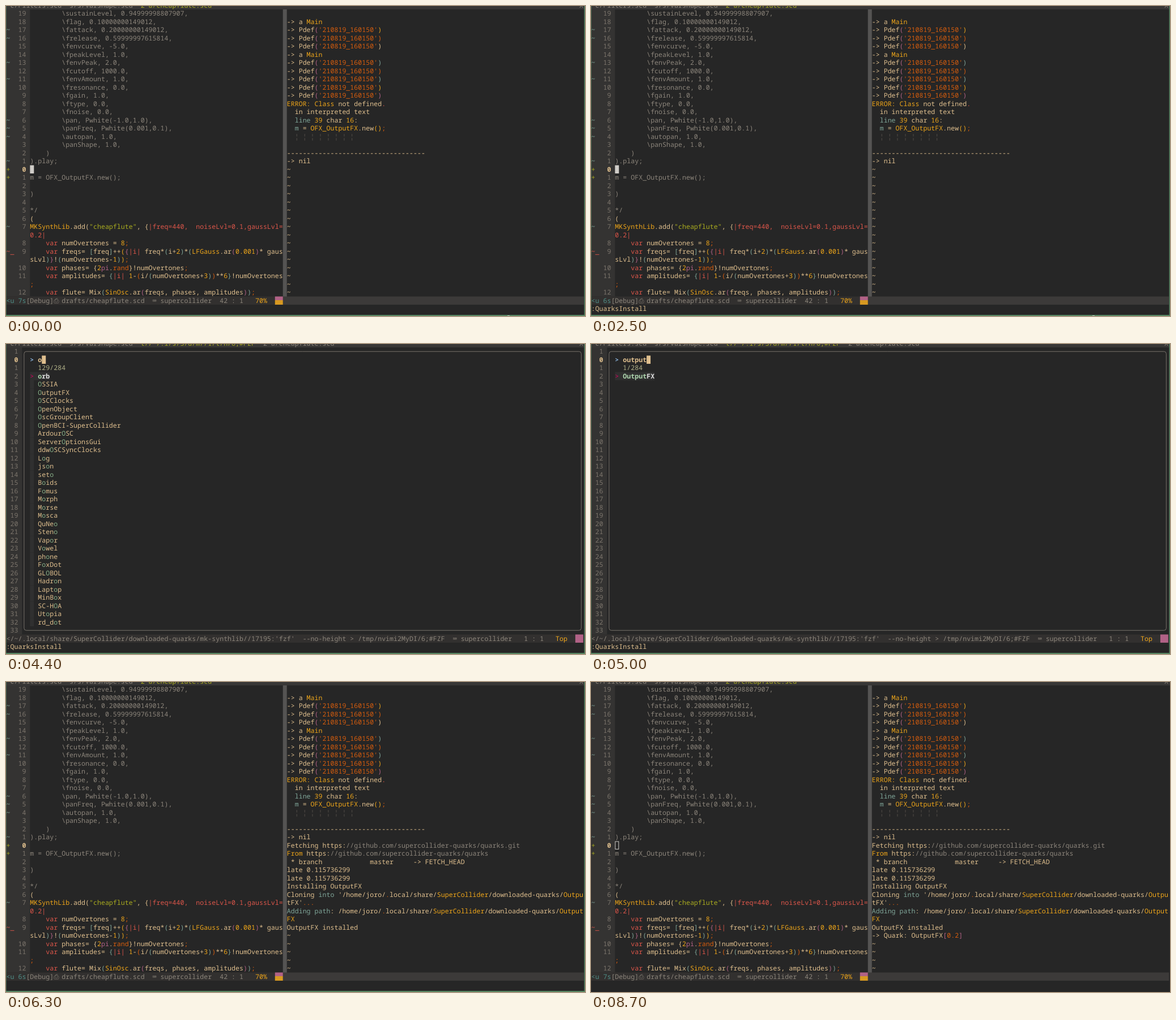
Animation of 1022 by 548 pixels, one loop 8.8 s. Source, as an HTML page with a canvas:

```html
<!DOCTYPE html>
<html lang="en">
<head>
<meta charset="utf-8">
<title>Installing a quark</title>
<style>
  html, body { margin: 0; width: 100%; height: 100%; overflow: hidden; background: #262626; }
  canvas { display: block; }
</style>
</head>
<body>
<canvas id="stage" width="1022" height="548"></canvas>
<script>
const ctx = document.getElementById('stage').getContext('2d');
const LOOP = 8800, W = 6.975, H = 14.5, X0 = 0.5, Y0 = 6, RIGHT = 71;
const FONT = '11.625px "Noto Sans Mono", "DejaVu Sans Mono", "DejaVu Sans", monospace';
const BG = '#262626', GUTTER = '#343332', BAR = '#32302f';

// Text may hold ^ plus one of these letters to switch colour.
const INK = {
  f: '#dfbf8e', g: '#8c857b', n: '#7c756c', y: '#eda51a', s: '#d65d0e', r: '#dc564a',
  G: '#a9ab1f', a: '#7fa598', p: '#b16286', d: '#5a544e', t: '#4f8f88',
  h: '#87af87', H: '#afd7af', w: '#e4e4e4', b: '#87afd7', m: '#d7005f', i: '#afaf87'
};

const x = col => X0 + col * W;
const y = row => Y0 + row * H;

function box(col, row, cols, color, rows = 1) {
  ctx.fillStyle = color;
  ctx.fillRect(x(col), y(row), cols * W, rows * H);
}

function put(col, row, text, ink = 'f', bold = false) {
  ctx.font = (bold ? 'bold ' : '') + FONT;
  ctx.fillStyle = INK[ink];
  for (let i = 0; i < text.length; i++) {
    if (text[i] === '^') ctx.fillStyle = INK[text[++i]];
    else {
      if (text[i] !== ' ') ctx.fillText(text[i], x(col), y(row) + 11);
      col++;
    }
  }
}

// Last value whose start time has passed.
const at = (steps, t) => steps.reduce((v, [start, next]) => t >= start ? next : v, 0);

const code = String.raw`
        \sustainLevel, 0.94999998807907,
        \flag, 0.10000000149012,
        \fattack, 0.20000000149012,
        \frelease, 0.59999997615814,
        \fenvcurve, -5.0,
        \fpeakLevel, 1.0,
        \fenvPeak, 2.0,
        \fcutoff, 1000.0,
        \fenvAmount, 1.0,
        \fresonance, 0.0,
        \fgain, 1.0,
        \ftype, 0.0,
        \fnoise, 0.0,
        \pan, Pwhite(-1.0,1.0),
        \panFreq, Pwhite(0.001,0.1),
        \autopan, 1.0,
        \panShape, 1.0,
    )
).play;

m = OFX_OutputFX.new();

)

*/
^f(
^yMKSynthLib^f.add(^G"cheapflute"^f, {^r|freq=^r440,  noiseLvl=0.1,gaussLvl=
^r0.2|
    ^rvar^f numOvertones = ^y8^s;
    ^rvar^f freqs= ^a[^ffreq^a]^f++^y(^p{^r|i|^f freq*^a(^fi+^y2^a)^f*^a(^yLFGauss^f.ar^p(^y0.001^p)^f* gaus
^fsLvl^a)^p}^f!^a(^fnumOvertones-^y1^a)^y)^s;
    ^rvar^f phases= {^y2^ppi^f.^srand^f}!numOvertones^s;
    ^rvar^f amplitudes= ^a{^r|i|^f ^y1^f-^s(^fi/^a(^fnumOvertones+^y3^a)^s)^f**^y6^a}^f!numOvertones
^s;
    ^rvar^f flute= Mix^a(^ySinOsc^f.ar^p(^ffreqs, phases, amplitudes^p)^a)^s;`.slice(1).split('\n');

const wrapped = [27, 30, 33];
const changed = [2, 3, 6, 8, 13, 14, 15, 18, 26];

const pdef = c => `-> Pdef^p(^s'210819_160150'^${c})`;
const log = [
  '', '-> a ^yMain', pdef('y'), pdef('s'), pdef('f'), '-> a ^yMain',
  pdef('a'), pdef('s'), pdef('a'), pdef('y'), pdef('p'),
  '^yERROR: Class^f not defined^r.', '  in interpreted text',
  '  ^aline ^y39^f char ^y16^f:', '  ^am^f = ^yOFX_OutputFX^f.new^y()^s;',
  '^d' + '  ¦ ¦ ¦ ¦ ¦ ¦ ¦ ¦', '', '-'.repeat(35), '-> nil',
  'Fetching https:^g//github.com/supercollider-quarks/quarks.git',
  '^yFrom^f https:^g//github.com/supercollider-quarks/quarks',
  ' * branch' + ' '.repeat(12) + 'master     -> FETCH_HEAD',
  'late 0.115736299', 'late 0.115736299', 'Installing OutputFX',
  "Cloning ^ainto^f '/home/joro/^s.^flocal/share/^ySuperCollider^f/downloaded-quarks/^yOutpu",
  "tFX'^s...",
  '^aAdding path^f: /home/joro/^s.^flocal/share/^ySuperCollider^f/downloaded-quarks/^yOutput',
  '^yFX', 'OutputFX installed', '-> Quark: OutputFX^p[^s0.2^p]'
];

const lists = {
  '': `3Dj APCmini API AllBuf AllGui AmbIEM ArdourOSC ArduinoQuaternion AudacityLabels
    AudioMulchClock AudioUnitBuilder AuditoryAugmentation Automation BBCut BandSplitter BatLib
    Bending Bjorklund Boids BugFixes3.4 CC14 CCIn Canvas3D Chordtris Clean-Samples
    Clean-repetition ClockFace Cluster Collapse Colliding CommonTests`,
  o: `orb OSSIA OutputFX OSCClocks OpenObject OscGroupClient OpenBCI-SuperCollider ArdourOSC
    ServerOptionsGui ddwOSCSyncClocks Log json seto Boids Fomus Morph Morse Mosca QuNeo Steno
    Vapor Vowel phone FoxDot GLOBOL Hadron Laptop MinBox SC-HOA Utopia rd_dot`,
  ou: `OutputFX ArdourOSC OscGroupClient OpenBCI-SuperCollider Fomus Republouk SoundIn2 JoshUGens
    LoopUtils ScoreUtils MonoBuffer ColorUtils PopUpMenus PolyBuffer VowelUtils ChordUtils
    ControlGui PopUpTreeMenu ConvolveUtils AudioMulchClock ContiguousBlock AudioUnitBuilder
    CollectionUtils ArduinoQuaternion AuditoryAugmentation SuperCollider-AutoTune`,
  outp: 'OutputFX'
};
for (const q in lists) lists[q] = lists[q].split(/\s+/);
const counts = { '': 284, o: 129, ou: 26, outp: 1 };

const commandSteps = [[500, 1], [700, 2], [900, 3], [1000, 4], [1200, 5], [1300, 6], [1400, 7],
  [1800, 9], [1900, 11], [2000, 13], [2100, 14], [5300, 0]];
const querySteps = [[4400, 1], [4500, 2], [4700, 4], [4900, 5], [5000, 6]];
const cursorSteps = [[0, 1], [500, 0], [2500, 1], [5900, 0], [6500, 1], [6900, 0],
  [7400, 1], [8500, 0], [8700, 2]];
const synthSteps = [[0, 7], [300, 6], [7400, 8], [8500, 7]];
const logSteps = [[0, 19], [5300, 27], [6300, 30], [6500, 31]];

function tabLine(tabs) {
  box(-1, -1, 149, '#383736');
  put(1, -1, 'c/Filters.scd  s/s/varshape.scd  ' + tabs, 'g');
  put(145, -1, 'X', 'g');
}

function editor(t) {
  tabLine('^G2 a/cheapflute.scd');
  box(0, 0, 6, GUTTER, 35);
  code.forEach((line, r) => {
    const skipped = wrapped.filter(w => w < r).length;
    if (!wrapped.includes(r)) {
      const num = String(Math.abs(r - 19) - skipped);
      put(5 - num.length, r, num, r === 19 ? 'f' : 'n', r === 19);
    }
    put(6, r, line, 'g');
    if (changed.includes(r)) put(0, r, '~', 'a');
  });
  put(0, 19, '+', 'G');
  put(0, 20, '+', 'G');
  put(0, 29, '~_', 'r');

  const cursor = at(cursorSteps, t);
  if (cursor === 1) box(6, 19, 1, '#d0cdc8');
  if (cursor === 2) {
    ctx.strokeStyle = '#d0cdc8';
    ctx.lineWidth = 1;
    ctx.strokeRect(x(6) + 0.5, y(19) + 0.5, W - 1, H - 1);
  }

  box(70, 0, 1, '#555453', 35.05);
  const shown = at(logSteps, t);
  for (let r = 0; r < 35; r++) put(RIGHT, r, r < shown ? log[r] : '~');

  box(0, 35, 70, BAR);
  box(70, 35, 76.2, '#3c3a39');
  put(0, 35, `<u ${at(synthSteps, t)}s^g[Debug]⎙ drafts/cheapflute.scd  ⌨ supercollider  42 : 1   ^y70%`, 't');
  box(68, 35, 2, '#b16286', 0.45);
  box(68, 35.45, 2, '#d79921', 0.55);
}

// Where each letter of the query falls in a name.
function hits(name, query) {
  const low = name.toLowerCase(), run = low.indexOf(query);
  if (!query) return [];
  if (query.length > 1 && run >= 0) return [...query].map((_, i) => run + i);
  let pos = name.search(/^[oO]|(?<=[a-z])O/);
  if (pos < 0) pos = low.indexOf(query[0]);
  const found = [pos];
  for (const ch of query.slice(1)) found.push(pos = low.indexOf(ch, pos + 1));
  return found;
}

function finder(t) {
  const query = 'output'.slice(0, at(querySteps, t));
  const key = query.slice(0, 4);
  tabLine('^Gt//~/.l/s/S/d/m//1/t/n/6;#FZF^g  2 a/cheapflute.scd');
  box(0, 0, 4, GUTTER, 35);
  for (let r = 0; r < 35; r++) {
    put(1, r, String(Math.abs(r - 1)).padStart(2), r === 1 ? 'f' : 'n', r === 1);
  }

  ctx.strokeStyle = '#77716a';
  ctx.lineWidth = 1;
  ctx.beginPath();
  ctx.roundRect(x(4.5), y(0.5), 141 * W, 34 * H, 4);
  ctx.stroke();

  put(6, 1, '>', 'b', true);
  put(8, 1, query, 'f', true);
  box(8 + query.length, 1, 1, INK.f);
  put(8, 2, counts[key] + '/284', 'i');
  lists[key].forEach((name, i) => {
    const row = i + 3, first = i === 0, marks = hits(name, query);
    box(6, row, first ? name.length + 2 : 1, '#303030');
    if (first) put(6, row, '>', 'm');
    [...name].forEach((ch, j) => {
      const ink = marks.includes(j) ? (first ? 'H' : 'h') : (first ? 'w' : 'f');
      put(8 + j, row, ch, ink, first);
    });
  });

  box(0, 35, 146.2, BAR);
  put(0, 35, "</~/.local/share/SuperCollider/downloaded-quarks/mk-synthlib//17195:'fzf'" +
    '  --no-height > /tmp/nvimi2MyDI/6;#FZF  ⌨ supercollider   1 : 1   ^yTop', 'g');
  box(144, 35, 2, '#b16286');
}

function pointer(px, py) {
  ctx.beginPath();
  [[0, 0], [0, 10], [2.5, 8], [4.5, 12], [6, 11], [4.3, 7.4], [7, 7]]
    .forEach(([dx, dy]) => ctx.lineTo(px + dx, py + dy));
  ctx.closePath();
  ctx.fillStyle = '#d0d0d0';
  ctx.fill();
}

function draw(t) {
  ctx.textRendering = 'geometricPrecision';
  ctx.fillStyle = BG;
  ctx.fillRect(0, 0, 1022, 548);
  const finding = t >= 3400 && t < 5300;
  (finding ? finder : editor)(t);

  const typed = at(commandSteps, t);
  put(0, 36, ':QuarksInstall'.slice(0, typed));
  if (t >= 500 && t < 2500) box(typed, 36, 1, '#d0cdc8');

  if (t < 8700) {
    ctx.fillStyle = '#568562';
    ctx.fillRect(0, 0, 0.6, 548);
    ctx.fillRect(1020.6, 0, 1.4, 548);
    ctx.fillRect(0, 546, 1022, 2);
  }
  if (t < 3400) {
    ctx.fillStyle = '#b5c4b5';
    ctx.fillRect(885, 547, 4, 1);
  }
  if (t >= 7700 && t < 8100) pointer(833, 536);
}

// Every change falls on a tenth of a second.
let last = -1;
function tick() {
  const step = Math.floor(performance.now() % LOOP / 100);
  if (step !== last) draw((last = step) * 100);
  requestAnimationFrame(tick);
}
tick();
</script>
</body>
</html>
```
